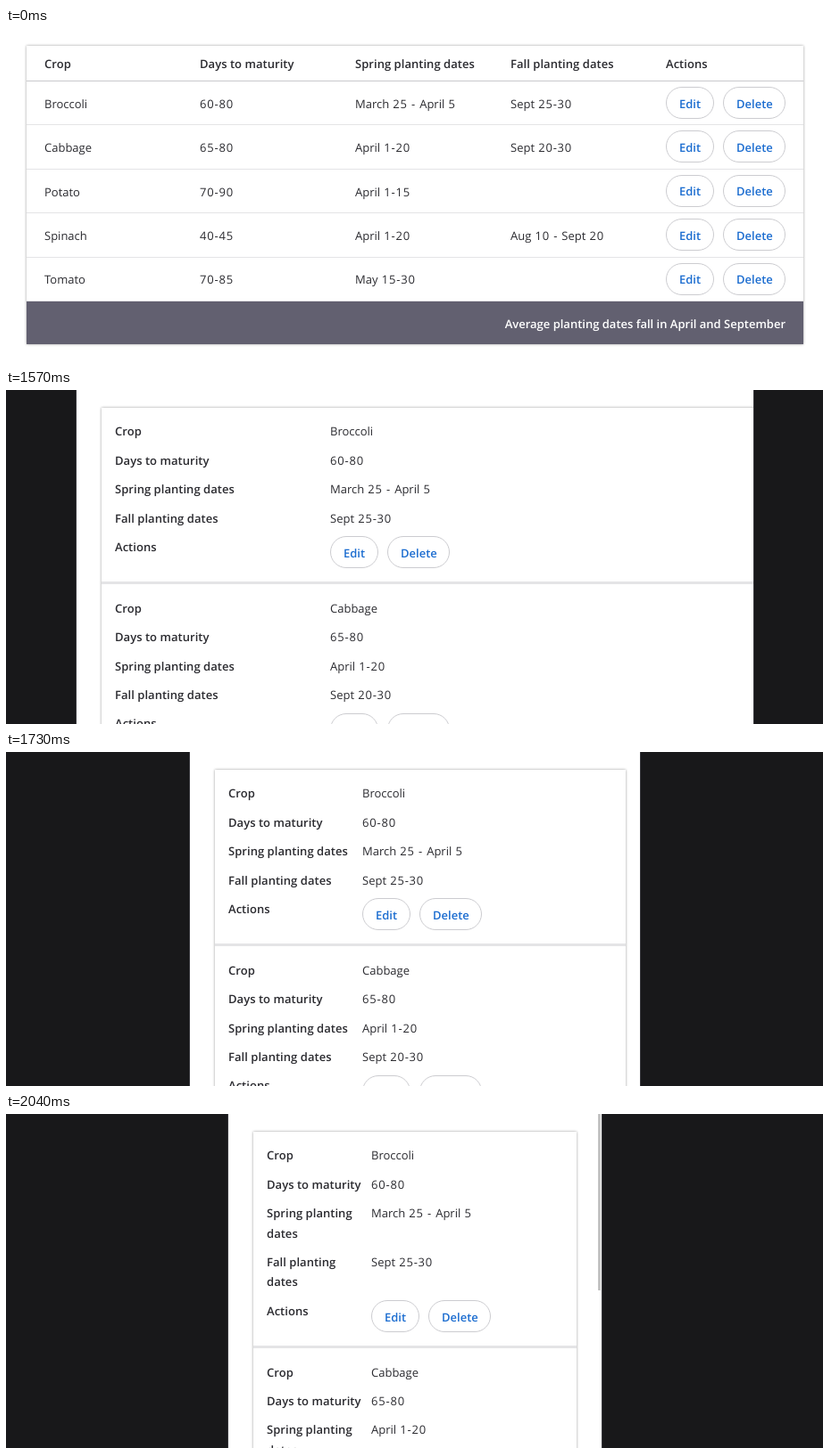
These frames come from a looping animation (915x375 px, 4440 ms). An HTML page:

```html
<!DOCTYPE html>
<html lang="en">
<head>
<meta charset="utf-8">
<title>Responsive planting table</title>
<style>
  html, body { margin: 0; width: 100%; height: 100%; overflow: hidden; background: #fff; }
  svg { display: block; width: 915px; height: 375px; }
  text { font: 400 13px "Open Sans", "Noto Sans", sans-serif; fill: #2b2b30; text-rendering: geometricPrecision; }
  .bold { font-weight: 600; letter-spacing: .04px; }
  .link { font-weight: 600; fill: #1c6dd0; }
  .foot { font-weight: 600; fill: #fff; text-anchor: end; }
  .num { letter-spacing: .8px; }
  .sheet { fill: #fff; filter: drop-shadow(0 .5px 1.7px rgba(0, 0, 0, .4)); }
  .pill { fill: #fff; stroke: #ccccd0; }
</style>
</head>
<body>
<svg id="stage" viewBox="0 0 915 375"></svg>
<script>
const LOOP = 4440, RESIZE_START = 1400, PAGE_SPAN = 916, MARGIN = 28, TOP = 20;
const LINE = 22.4, ROW = 49.4, CARD_BREAKPOINT = 760;
const RULE = '#e4e4e6', BACKDROP = '#18181a', FRAME = '#38383d';

// Left edge of the page at each resize step, and how long each step lasts.
const lefts = [-4, -1, 5, 17, 33, 54, 79, 105, 132, 157, 179, 196, 206,
  215, 223, 230, 238, 240, 241, 242, 244, 246, 248, 249, 249];
const durations = [30, 30, 30, 30, 30, 20, 30, 30, 20, 30, 20, 30,
  30, 20, 30, 20, 20, 30, 30, 20, 30, 30, 20, 30];
const starts = [RESIZE_START];
for (const ms of durations) starts.push(starts[starts.length - 1] + ms);

// Labels wrap before their last word when less than `fit` is available.
const heads = [
  { text: 'Crop', fit: 30 },
  { text: 'Days to maturity', fit: 104 },
  { text: 'Spring planting dates', fit: 134 },
  { text: 'Fall planting dates', fit: 115 },
  { text: 'Actions', fit: 50 }
];
const crops = [
  ['Broccoli', '60-80', 'March 25 - April 5', 'Sept 25-30'],
  ['Cabbage', '65-80', 'April 1-20', 'Sept 20-30'],
  ['Potato', '70-90', 'April 1-15', ''],
  ['Spinach', '40-45', 'April 1-20', 'Aug 10 - Sept 20'],
  ['Tomato', '70-85', 'May 15-30', '']
];

const { round } = Math;
const rect = (x, y, w, h, fill) =>
  `<rect x="${x}" y="${y}" width="${w}" height="${h}" fill="${fill}"/>`;
const sheet = (x, w, h) =>
  `<rect class="sheet" x="${x}" y="${TOP}" width="${w}" height="${h}"/>`;
const label = (x, y, text, kind = 'bold') =>
  `<text class="${kind}" x="${round(x)}" y="${round(y)}">${text}</text>`;
const value = (x, y, text) =>
  label(x, y, text.replace(/[\d\s-]+/g, '<tspan class="num">$&</tspan>'), '');

function lines(head, room) {
  if (room >= head.fit) return [head.text];
  const cut = head.text.lastIndexOf(' ');
  return [head.text.slice(0, cut), head.text.slice(cut + 1)];
}

function heading(x, y, parts) {
  return parts.map((part, i) => label(x, y + i * LINE, part)).join('');
}

function pill(x, y, w, text, baseline) {
  return `<rect class="pill" x="${x + .5}" y="${y + .5}" width="${w - 1}" height="35" rx="17.5"/>`
    + label(x + 15, baseline, text, 'link');
}

function buttons(x, y, baseline) {
  x = round(x);
  y = round(y);
  return pill(x, y, 54, 'Edit', baseline) + pill(x + 64, y, 70, 'Delete', baseline);
}

function tableView(x, width) {
  const column = width / heads.length;
  const columnX = i => x + 20 + i * column;
  const titles = heads.map(head => lines(head, column - 40));
  const headBottom = 59 + (titles.some(parts => parts.length > 1) ? LINE : 0);
  const footTop = round(headBottom + ROW * crops.length);

  let out = sheet(x, width, footTop + 49 - TOP);
  titles.forEach((parts, i) => out += heading(columnX(i), 45, parts));
  crops.forEach((crop, r) => {
    const y = headBottom + r * ROW;
    out += rect(x, round(y), width, 1, r ? RULE : '#c9c9cc');
    crop.forEach((text, i) => out += value(columnX(i), y + 30.8, text));
    out += buttons(columnX(4), round(y) + 7, y + 30.6);
  });
  return out + rect(x, footTop, width, 1, RULE)
    + rect(x, footTop + 1, width, 48, '#626070')
    + label(x + width - 20, headBottom + crops.length * ROW + 30.8,
      'Average planting dates fall in April and September', 'foot');
}

function cardView(x, width) {
  const labelWidth = (width - 10) / 3;
  const valueX = x + 15 + labelWidth;
  let out = sheet(x, width, 400);
  let y = 51.3;
  for (const crop of crops.slice(0, 2)) {
    heads.forEach((head, i) => {
      const parts = lines(head, labelWidth - 10);
      out += heading(x + 15, y, parts);
      if (i < crop.length) {
        out += value(valueX, y, crop[i]);
        y += parts.length * LINE + 10;
      }
    });
    out += buttons(valueX, y - 16.5, y + 7);
    out += rect(x, round(y + 34.3), width, 3, RULE);
    y += 69;
  }
  return out;
}

function backdrop(left, right) {
  return rect(0, 0, left, 375, BACKDROP) + rect(right, 0, 915 - right, 375, BACKDROP)
    + rect(left - 1, 0, 1, 375, FRAME) + rect(right, 0, 1, 375, FRAME);
}

function scene(step) {
  const left = step < 0 ? -5 : lefts[step];
  const before = step < 0 ? left : lefts[Math.max(0, step - 1)];
  // The layout trails the window edge by a little over half a step.
  const laidOut = .6 * before + .4 * left;
  const width = round(PAGE_SPAN - 2 * MARGIN - 2 * laidOut);
  const right = PAGE_SPAN - left;
  const view = width < CARD_BREAKPOINT ? cardView : tableView;

  let out = rect(0, 0, 915, 375, '#fff') + view(left + MARGIN, width);
  if (step === lefts.length - 1) out += rect(right - 4, 0, 3, 198, '#c4c4c4');
  if (left > 0) out += backdrop(left, right);
  return out;
}

const stage = document.getElementById('stage');
const begin = performance.now();
let shown = null;

function tick() {
  const time = (performance.now() - begin) % LOOP;
  const step = starts.filter(start => start <= time).length - 1;
  if (step !== shown) {
    stage.innerHTML = scene(step);
    shown = step;
  }
  requestAnimationFrame(tick);
}
tick();
</script>
</body>
</html>
```
